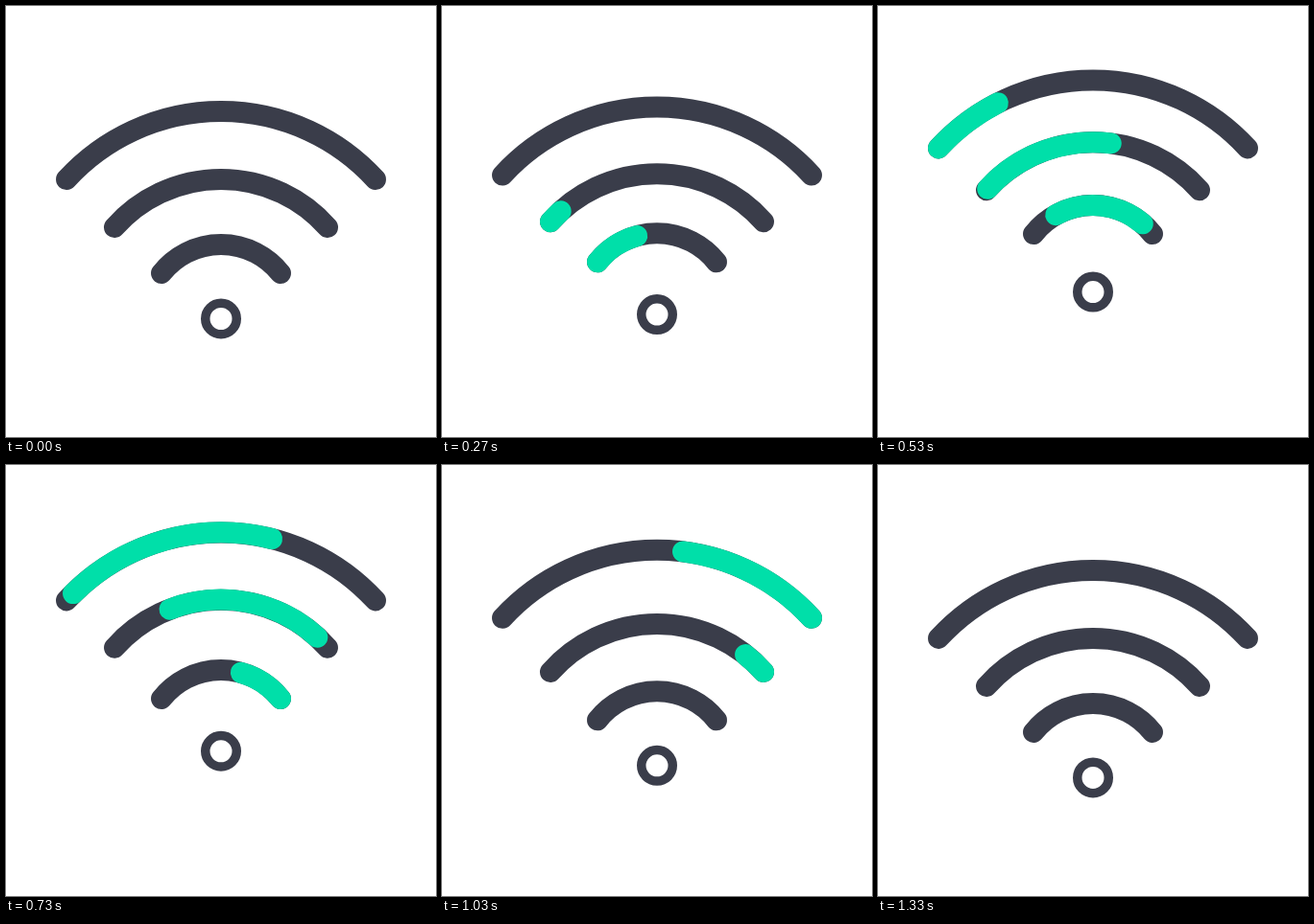
Write an HTML page that moves like this. It is 448 px wide and 450 px high and loops after 1.36 s.

```html
<!DOCTYPE html>
<html lang="en">
<head>
<meta charset="utf-8">
<title>Wi-Fi loader</title>
<style>
  html, body { margin: 0; width: 100%; height: 100%; overflow: hidden; background: #fff; }
  svg { display: block; width: 100vw; height: 100vh; }
  path, circle { fill: none; stroke: #3a3d4a; stroke-width: 22; stroke-linecap: round; }
  .fill { stroke: #00dfa9; }
  circle { stroke-width: 9.5; }
</style>
</head>
<body>
<svg viewBox="0 0 448 450">
  <g id="icon"><circle cx="224" cy="326.5" r="16.25"/></g>
</svg>
<script>
const LOOP = 1360, FPS = 30, LAST = 40, CX = 224;
const LIFT = 28.5, HOP = 13.2;

// radius, centre y, half angle in degrees, start delay in ticks
const ARCS = [
  { r: 79, cy: 328, half: 51.7, delay: 0 },
  { r: 148.2, cy: 329.2, half: 48.5, delay: 5 },
  { r: 218, cy: 328, half: 47.6, delay: 10 }
];

const icon = document.getElementById('icon');

function add(tag, parent, attrs = {}) {
  const el = document.createElementNS('http://www.w3.org/2000/svg', tag);
  for (const key in attrs) el.setAttribute(key, attrs[key]);
  return parent.appendChild(el);
}

// Eased progress of tick k between a and b
function ease(k, a, b) {
  const u = Math.min(1, Math.max(0, (k - a) / (b - a)));
  return u * u * (3 - 2 * u);
}

function arcPath({ r, cy, half }, from, to) {
  const point = p => {
    const a = (2 * p - 1) * half * Math.PI / 180;
    return `${(CX + r * Math.sin(a)).toFixed(3)} ${(cy - r * Math.cos(a)).toFixed(3)}`;
  };
  return `M${point(from)}A${r} ${r} 0 0 1 ${point(to)}`;
}

for (const arc of ARCS) {
  arc.group = add('g', icon);
  add('path', arc.group, { d: arcPath(arc, 0, 1) });
  arc.fill = add('path', arc.group, { class: 'fill' });
}

const shift = (el, y) => el.setAttribute('transform', `translate(0 ${y.toFixed(3)})`);

function draw(k) {
  shift(icon, -LIFT * (ease(k, 5, 17) - ease(k, 20, 40.5)));
  for (const arc of ARCS) {
    const t = k - arc.delay;
    const head = ease(t, 0, 20), tail = ease(t, 10, 30);
    shift(arc.group, -HOP * (ease(t, 0, 15) - ease(t, 15, 30)));
    arc.fill.setAttribute('d', head > tail ? arcPath(arc, tail, head) : '');
  }
}

function tick() {
  const ms = performance.now() % LOOP;
  // Poses step at 30 per second
  draw(Math.min(LAST, Math.floor((ms + 3.4) * FPS / 1000)));
  requestAnimationFrame(tick);
}
tick();
</script>
</body>
</html>
```
